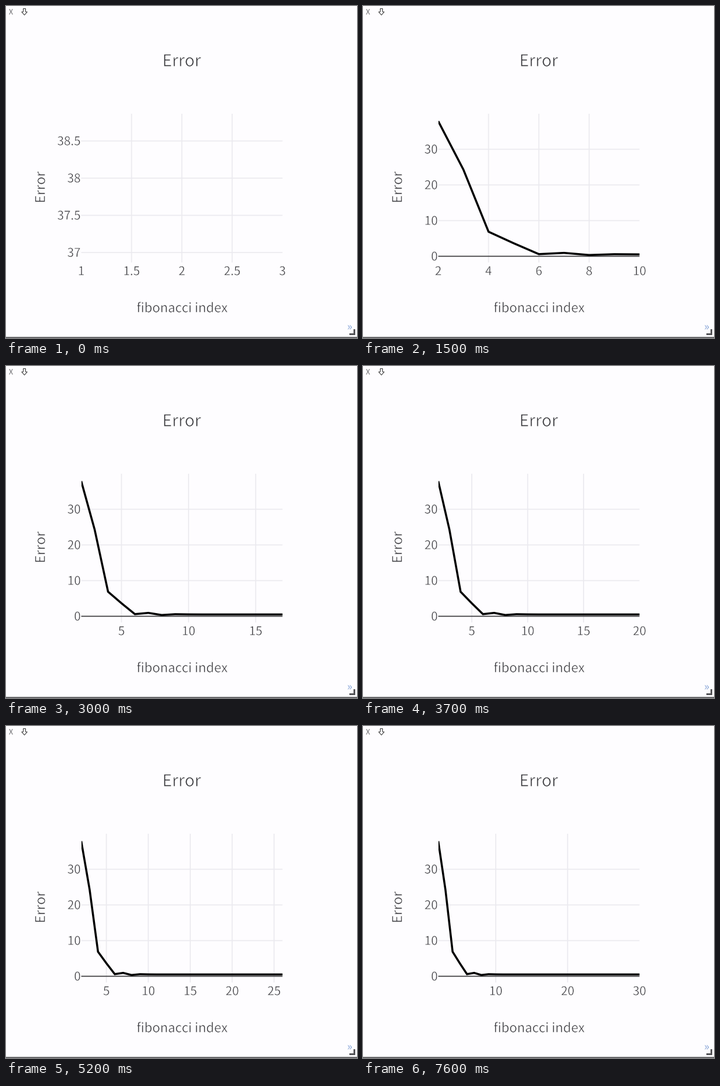
Animation of 600 by 567 pixels, one loop 8.4 s. Source, as a matplotlib script:

```python
import math
import matplotlib.pyplot as plt
from matplotlib.animation import FuncAnimation
from matplotlib.collections import LineCollection
from matplotlib.patches import Polygon, Rectangle
from matplotlib.patheffects import Stroke

W, H, DPI = 600, 567, 96
PX = 72 / DPI                      # one pixel in points
STEP, LOOP = 100, 8400
LEFT, TOP, PW, PH = 128.6, 184, 344, 254
FONT = "Noto Sans CJK JP"
INK, GRID, PAPER = "#36363a", "#ebeaef", "#fefdff"

# the error at each index, starting with index 2
errors = [37.866, 24.3, 6.88, 3.65, 0.6, 0.95, 0.35, 0.58, 0.53]
errors += [0.51] * 20
# moments at which one more point arrives
arrivals = [*range(100, 1501, 200), *range(1800, 3401, 200),
            *range(3700, 4301, 200), 4600, 4900, 5200, 5600, 6000, 6700, 7600]

fig = plt.figure(figsize=(W / DPI, H / DPI), dpi=DPI, facecolor=PAPER)
ax = fig.add_axes([0, 0, 1, 1])
ax.set_xlim(0, W)
ax.set_ylim(H, 0)
ax.axis("off")


def label(x, y, s, size, color=INK, **kw):
    # a paper-coloured outline thins the letters to a light weight
    kw = {"ha": "center", "va": "baseline", **kw}
    thin = Stroke(linewidth=0.024 * size * PX, foreground=PAPER)
    return ax.text(x, y, s, fontsize=size * PX, color=color, family=FONT,
                   path_effects=[thin], **kw)


def shape(points, **kw):
    ax.add_patch(Polygon(points, **kw))


def tick_step(span):
    rough = span / 5
    base = 10 ** math.floor(math.log10(rough))
    return base * next((m for m in (2, 5, 10) if m > rough / base), 10)


def ticks(lo, hi):
    d = tick_step(hi - lo)
    first = math.ceil(lo / d - 1e-6)
    last = math.floor(hi / d + 1e-6)
    return [k * d for k in range(first, last + 1)]


# static parts
label(300.5, 103, "Error", 28)
label(300.8, 523, "fibonacci index", 22)
label(66.7, 309.5, "Error", 23, rotation=90, rotation_mode="anchor")
label(8.5, 14.6, "X", 13)
label(587.5, 554, "»", 19, color="#3f6fc0")
shape([(29.5, 4.5), (33.5, 4.5), (33.5, 10), (36.3, 10), (31.5, 15.5),
       (26.7, 10), (29.5, 10)], fill=False, ec="#333333", lw=PX)
shape([(593.5, 552), (597, 552), (597, 562), (587, 562), (587, 558.5),
       (593.5, 558.5)], fc="#555558", lw=0)
ax.add_patch(Rectangle((0, 565), W, 2, fc="#6a6a6c", lw=0))

# moving parts
grid = LineCollection([], colors=GRID, linewidths=1.7 * PX, zorder=1)
zero = LineCollection([], colors="#38383a", linewidths=1.7 * PX, zorder=2)
for lines in (grid, zero):
    lines.set_snap(False)
    ax.add_collection(lines, autolim=False)
trace, = ax.plot([], [], color="black", lw=3.5 * PX, zorder=3, snap=False,
                 solid_capstyle="butt", solid_joinstyle="miter")
trace.set_clip_path(Rectangle((LEFT, TOP), PW, PH, transform=ax.transData))
x_labels = [label(0, 459.7, "", 20.6) for _ in range(10)]
y_labels = [label(127.7, 0, "", 20.6, ha="right") for _ in range(10)]


def draw(frame):
    count = 1 + sum(t <= frame * STEP for t in arrivals)
    ys = errors[:count]
    xs = [2 + i for i in range(count)]
    if count == 1:
        x0, x1, y0, y1 = 1, 3, ys[0] - 1, ys[0] + 1
    else:
        pad = (max(ys) - min(ys)) / 18
        x0, x1, y0, y1 = 2, xs[-1], min(ys) - pad, max(ys) + pad

    def px(x):
        return LEFT + PW * (x - x0) / (x1 - x0)

    def py(y):
        return TOP + PH * (y1 - y) / (y1 - y0)

    for t in x_labels + y_labels:
        t.set_text("")
    segs, base = [], []
    for t, v in zip(x_labels, ticks(x0, x1)):
        x = px(v)
        t.set_text(f"{v:g}")
        t.set_x(x)
        if LEFT + 1 < x < LEFT + PW - 1:
            segs.append([(x, TOP), (x, TOP + PH)])
    for t, v in zip(y_labels, ticks(y0, y1)):
        y = py(v)
        t.set_text(f"{v:g}")
        t.set_y(y + 7.3)
        (segs if v else base).append([(LEFT, y), (LEFT + PW, y)])
    grid.set_segments(segs)
    zero.set_segments(base)
    trace.set_data([px(x) for x in xs], [py(y) for y in ys])
    return []


anim = FuncAnimation(fig, draw, frames=LOOP // STEP, interval=STEP,
                     init_func=lambda: draw(0), repeat=True, repeat_delay=0)
plt.show()
```
